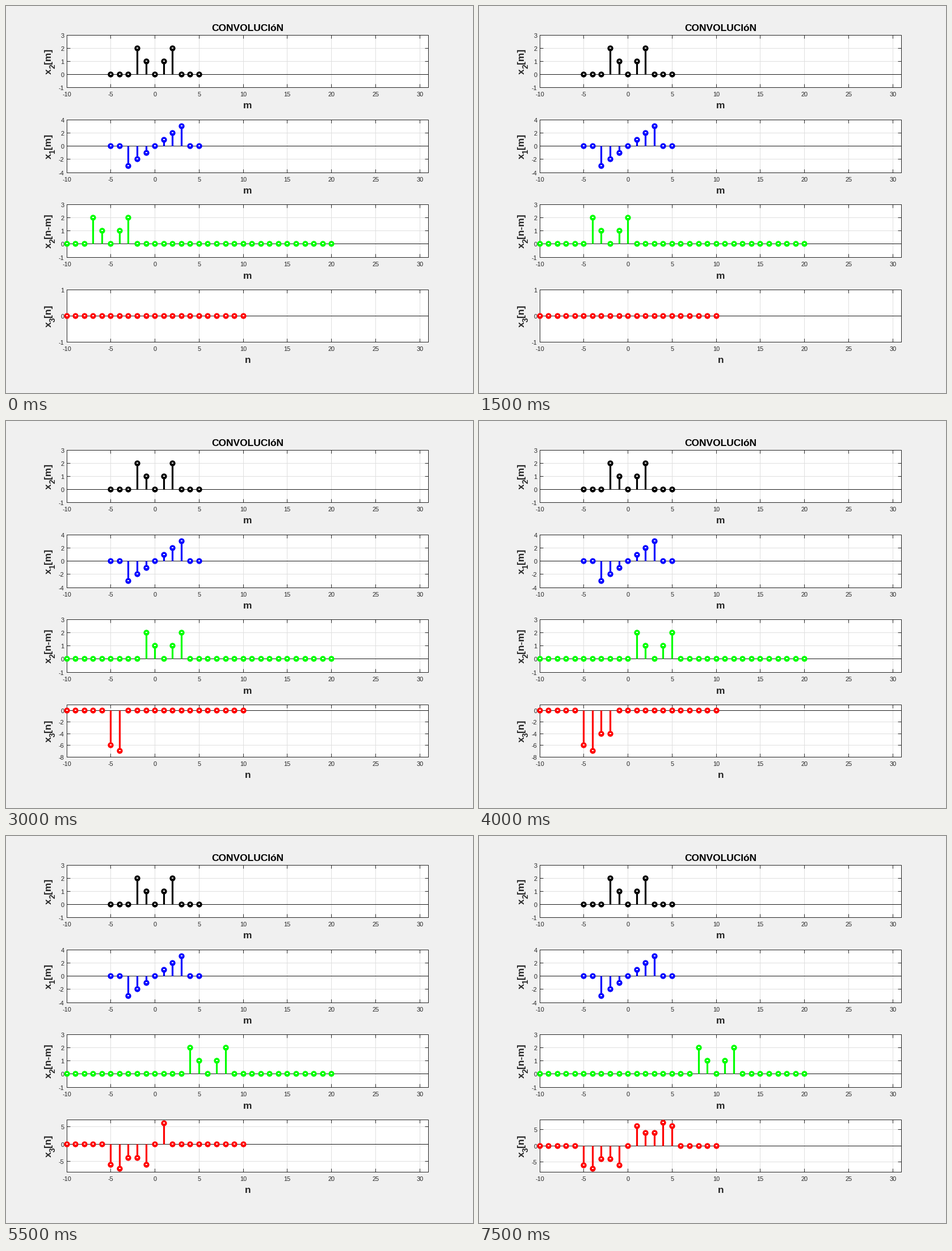
A matplotlib script for the animation above (8 s loop, 823 by 681 pixels).

```python
import numpy as np
import matplotlib.pyplot as plt
from matplotlib.animation import FuncAnimation
from matplotlib.patches import Circle, Rectangle

W, H, DPI = 823, 681, 64
FRAMES, INTERVAL = 16, 500
PT = 72 / DPI                      # points per pixel
LEFT, RIGHT = 107, 744
TOPS, BOTTOMS = (51, 200, 349, 499), (143, 293, 442, 591)
DARK, GRID = "#262626", "#dfdfdf"
BIG, SMALL = 17.4, 11
EM = {"x": 0.556, "[": 0.333, "]": 0.333, "-": 0.333, "m": 0.889, "n": 0.611}

plt.rcParams["font.family"] = "Liberation Sans"
plt.rcParams["toolbar"] = "None"

fig = plt.figure(figsize=(W / DPI, H / DPI), dpi=DPI, facecolor="#f0f0f0")
ax = fig.add_axes([0, 0, 1, 1])
ax.set(xlim=(0, W), ylim=(H, 0))
ax.axis("off")


def x1(m):
    return np.where(abs(m) <= 3, m, 0)


def x2(m):
    return np.where(abs(m) <= 2, abs(m), 0)


def x3(n):
    m = np.arange(-5, 6)
    return np.array([np.sum(x1(m) * x2(i - m)) for i in n])


def text(x, y, s, size, color=DARK, ha="center", **kw):
    return ax.text(x, y, s, fontsize=size * PT, color=color, ha=ha,
                   va="baseline", zorder=2, **kw)


def to_x(v):
    """Centre of the pixel column for a data value."""
    return np.floor(LEFT + (np.asarray(v) + 10) * 637.8 / 41) + 0.5


def to_y(v, row, lim):
    """Centre of the pixel row for a data value."""
    top, bottom = TOPS[row] + 0.2, BOTTOMS[row] + 0.2
    scale = (bottom - top) / (lim[1] - lim[0])
    return np.floor(bottom - (np.asarray(v) - lim[0]) * scale) + 0.5


def segments(horizontal, pos, start, end, color, width=1, z=1):
    draw = ax.hlines if horizontal else ax.vlines
    return draw(pos, start, end, colors=color, linewidth=width * PT,
                zorder=z, snap=False)


def panel(row, t, v, lim, color):
    """Draw one stem plot and return its artists."""
    top, bottom = TOPS[row] + 0.5, BOTTOMS[row] + 0.5
    left, right = LEFT + 0.5, RIGHT + 0.5
    span = lim[1] - lim[0]
    step = 1 if span <= 4 else 2 if span <= 9 else 5
    yticks = np.arange(np.ceil(lim[0] / step) * step, lim[1] + 1, step)
    yticks = yticks[yticks <= lim[1]].astype(int)
    gx = to_x(np.arange(-10, 31, 5))
    gy = to_y(yticks, row, lim)
    zero = float(to_y(0, row, lim))

    box = Rectangle((left, top), right - left, bottom - top, fc="white",
                    ec="none", zorder=0, snap=False)
    frame = Rectangle((left, top), right - left, bottom - top, fc="none",
                      ec=DARK, lw=PT, zorder=2, snap=False)
    art = [ax.add_patch(box), ax.add_patch(frame),
           segments(False, gx, top, bottom, GRID),
           segments(True, gy, left, right, GRID),
           segments(False, gx, top, top + 6, DARK, z=2),
           segments(False, gx, bottom - 6, bottom, DARK, z=2),
           segments(True, gy, left, left + 6, DARK, z=2),
           segments(True, gy, right - 6, right, DARK, z=2),
           segments(True, [zero], left, right, "#1a1a1a", z=2)]
    art += [text(102.6, y + 4.3, str(k), SMALL, ha="right")
            for k, y in zip(yticks, gy)]

    px, py = to_x(t), to_y(v, row, lim)
    tall = np.asarray(v) != 0
    art.append(segments(False, px[tall], zero, py[tall], color, 3.2, 3))
    art += [ax.add_patch(Circle(p, 5.15, fc=color, ec="none", zorder=4))
            for p in zip(px, py)]
    art.append(segments(True, py - 0.5, px - 1.5, px + 1.5, "white", 2, 5))
    return art


def side_label(row, sub, tail):
    """Rotated label: x, a subscript, then the bracketed argument."""
    small = 0.8 * BIG
    head, mid = EM["x"] * BIG, 0.556 * small
    total = head + mid + sum(EM[c] for c in tail) * BIG
    y = (TOPS[row] + BOTTOMS[row]) / 2 + 0.5 + total / 2
    kw = dict(ha="left", rotation=90, rotation_mode="anchor", weight="bold")
    text(79.5, y, "x", BIG, **kw)
    text(86.5, y - head, sub, small, **kw)
    text(79.5, y - head - mid, tail, BIG, **kw)


labels = (("2", "[m]", "m"), ("1", "[m]", "m"), ("2", "[n-m]", "m"), ("3", "[n]", "n"))
for row, (sub, tail, name) in enumerate(labels):
    side_label(row, sub, tail)
    text(426, BOTTOMS[row] + 37.5, name, BIG, weight="bold")
    for k in range(-10, 31, 5):
        text(to_x(k), BOTTOMS[row] + 16, str(k), SMALL)
text(426, 44, "CONVOLUCIóN", BIG, "black", weight="bold")

m = np.arange(-5, 6)
panel(0, m, x2(m), (-1, 3), "black")
panel(1, m, x1(m), (-4, 4), "#0000ff")

wide = np.arange(-10, 21)
n = np.arange(-10, 11)
result = x3(n)
moving = []


def update(k):
    while moving:
        moving.pop().remove()
    moving.extend(panel(2, wide, x2(wide - (k - 5)), (-1, 3), "#00ff00"))
    shown = np.where(n <= k - 10, result, 0)
    lim = (shown.min() - 1, shown.max() + 1)
    moving.extend(panel(3, n, shown, lim, "#ff0000"))
    return moving


anim = FuncAnimation(fig, update, frames=FRAMES, interval=INTERVAL,
                     repeat=True, blit=False)
plt.show()
```
